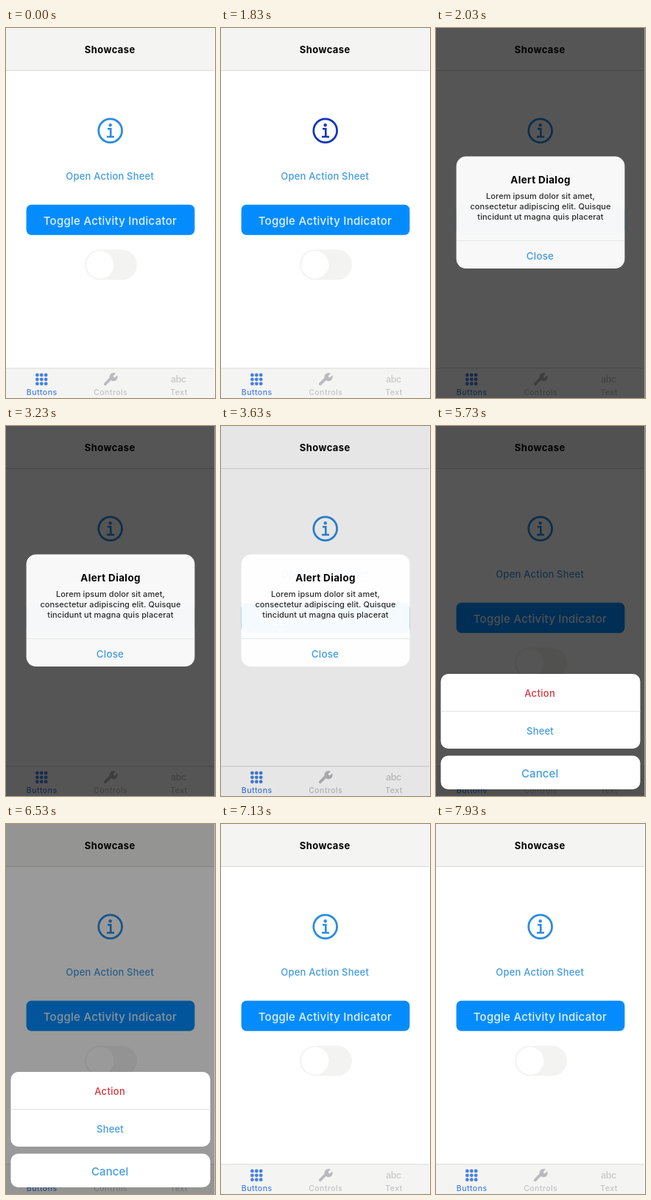
An HTML page for the animation above (8 s loop, 284 by 500 pixels).

```html
<!DOCTYPE html>
<html lang="en">
<head>
<meta charset="utf-8">
<title>Showcase</title>
<style>
  html, body { margin: 0; width: 100%; height: 100%; overflow: hidden; background: #fff; }
  svg { display: block; width: 284px; height: 500px; }
  text { font: 500 13px Inter, Roboto, sans-serif; text-anchor: middle; letter-spacing: .2px; }
  .bar { fill: #f4f4f3; }
  .rule { fill: #dadad9; }
  .link { fill: #429be2; }
  .bold { font-weight: 700; letter-spacing: .4px; }
  .body { font-size: 11px; letter-spacing: .08px; fill: #2c2c2c; }
  .tab { font-size: 10.5px; letter-spacing: .45px; fill: #c3c3c8; }
  .active { fill: #4580e6; }
  .panel { fill: #fff; fill-opacity: .96; }
</style>
</head>
<body>
<svg viewBox="0 0 284 500">
  <g id="tones">
    <rect class="bar" width="283" height="57"/>
    <rect class="bar" y="460" width="283" height="40"/>
    <rect x="107" y="299.5" width="71" height="41" rx="20.5" fill="#f3f3f2"/>
    <circle cx="127.8" cy="320" r="18.6" fill="#fff"/>
  </g>
  <rect class="rule" y="57" width="283" height="1"/>
  <rect class="rule" y="459.4" width="283" height="1"/>
  <text class="bold" x="141.2" y="34">Showcase</text>

  <g id="info" fill="none" stroke-width="2.8">
    <circle cx="141.7" cy="138.7" r="15.9"/>
    <path d="M138 136.3h4.3v10M137 147h10" stroke-width="2.6"/>
    <circle cx="141.7" cy="131.3" r="1" stroke-width="2.5"/>
  </g>

  <text id="open" x="141.2" y="204.5">Open Action Sheet</text>

  <rect x="27.6" y="238.7" width="228.8" height="41" rx="7" fill="#048cfe"/>
  <text x="141.4" y="266" fill="#e4f2ff" style="font-size:15px;letter-spacing:.27px">Toggle Activity Indicator</text>

  <g id="dots" class="active"></g>
  <path d="M134.8 481.2l7.5-7.5" stroke="#b9b9be" stroke-width="3.8" stroke-linecap="round"/>
  <path d="M149 466.8l-3.2 3.2 .4 2 2 .3 3-3a5.6 5.6 0 1 1-2.2-2.5z" fill="#b9b9be"/>
  <text x="234.5" y="479" fill="#c9c9cc" style="font-size:12.5px;letter-spacing:-.4px">abc</text>
  <text class="tab active" x="48.7" y="496">Buttons</text>
  <text class="tab" x="142.2" y="496">Controls</text>
  <text class="tab" x="235" y="496">Text</text>

  <rect id="dim" width="283.6" height="500"/>

  <g id="alert">
    <rect class="panel" x="27.6" y="173.6" width="228.8" height="151.4" rx="13"/>
    <rect x="28" y="287" width="228" height="1" fill="#e6e8ea"/>
    <text class="bold" x="142.1" y="210" style="font-size:13.4px">Alert Dialog</text>
    <text class="body" x="142" y="230.5">Lorem ipsum dolor sit amet,</text>
    <text class="body" x="142" y="245">consectetur adipiscing elit. Quisque</text>
    <text class="body" x="142" y="259">tincidunt ut magna quis placerat</text>
    <text class="link" x="141.5" y="313" style="font-size:13.4px">Close</text>
  </g>

  <g id="sheet">
    <rect x="6.5" y="335" width="271" height="101" rx="10" fill="#fff"/>
    <rect x="6.5" y="385" width="271" height="1" fill="#e3e3e3"/>
    <text x="141.2" y="366" fill="#d8353b" style="letter-spacing:.35px">Action</text>
    <text class="link" x="141.5" y="417">Sheet</text>
    <rect x="6.5" y="445.5" width="271" height="45.5" rx="10" fill="#fff"/>
    <text class="link" x="141.2" y="475" style="font-size:15px;letter-spacing:.1px">Cancel</text>
  </g>
</svg>
<script>
const LOOP = 8000, DIM = .667;
const $ = id => document.getElementById(id);
const [tones, info, open, dim, alertBox, sheet] =
  ["tones", "info", "open", "dim", "alert", "sheet"].map($);

for (let i = 0; i < 9; i++) {
  const dot = document.createElementNS("http://www.w3.org/2000/svg", "circle");
  dot.setAttribute("cx", 42.4 + i % 3 * 5.9);
  dot.setAttribute("cy", 468.9 + Math.floor(i / 3) * 5.9);
  dot.setAttribute("r", 2.4);
  $("dots").append(dot);
}

const ramp = (t, a, b) => Math.min(1, Math.max(0, (t - a) / (b - a)));
const ease = p => 1 - (1 - p) ** 3;
const within = (t, a, b) => t >= a && t < b;
const show = (el, alpha) => el.setAttribute("opacity", alpha);

function draw(t) {
  info.setAttribute("stroke", within(t, 1780, 1900) ? "#1436bd" : "#2b8ce0");
  open.setAttribute("fill", within(t, 4680, 4900) ? "#2f5078" : "#429be2");

  // The backdrop fades out before its panel leaves.
  const alertDim = ramp(t, 1880, 2000) - ramp(t, 3418, 3668);
  const sheetDim = ramp(t, 4900, 5080) - ramp(t, 6430, 6680);
  show(dim, DIM * (alertDim + sheetDim));

  // The pale bars and switch blend into the page behind the alert.
  const alertAlpha = ramp(t, 1880, 2000) - ramp(t, 3650, 3725);
  show(alertBox, alertAlpha);
  show(tones, 1 - alertAlpha);

  const up = ease(ramp(t, 4900, 5120)) - ramp(t, 6580, 6780) ** 2;
  sheet.setAttribute("transform", `translate(0 ${170 * (1 - up)})`);
}

function frame(now) {
  draw(now % LOOP);
  requestAnimationFrame(frame);
}
draw(0);
requestAnimationFrame(frame);
</script>
</body>
</html>
```
